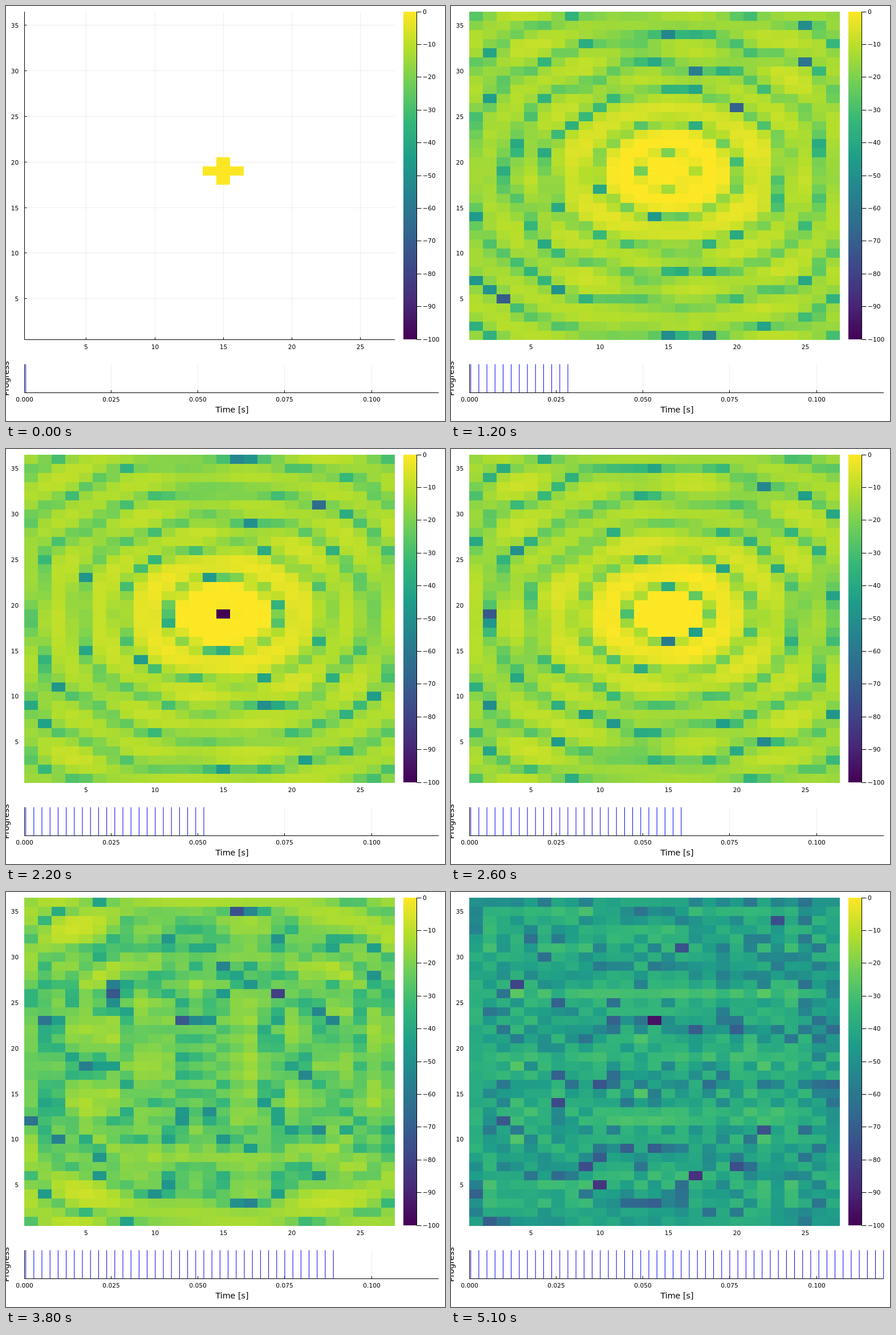
Animation of 770x727 px, one loop 5.2 s. Source, as an HTML page with a canvas:

```html
<!DOCTYPE html>
<html lang="en">
<head>
<meta charset="utf-8">
<title>Sound field</title>
<style>
html, body { margin: 0; width: 770px; height: 727px; overflow: hidden; background: #fff; }
svg, canvas { position: absolute; left: 0; top: 0; }
text { font: 10.67px "DejaVu Sans", sans-serif; fill: #000; }
.title { font-size: 14.3px; text-anchor: middle; }
.axis { stroke: #000; stroke-width: 1; fill: none; }
.grid { stroke: #000; stroke-opacity: .07; stroke-width: 1; }
</style>
</head>
<body>
<svg id="chart" width="770" height="727" viewBox="0 0 770 727">
  <defs><linearGradient id="scale" x1="0" y1="1" x2="0" y2="0"></linearGradient></defs>
</svg>
<canvas id="field" width="770" height="727"></canvas>
<script>
const COLS = 27, ROWS = 36, LAYERS = 16;
const LEFT = 32.5, RIGHT = 682.1, TOP = 10, BOTTOM = 584.5;
const FRAMES = 52, FRAME_MS = 100, STRIDE = 7, RATE = 3000;
const viridis = ['440154', '482878', '3e4989', '31688e', '26828e',
                 '1f9e89', '35b779', '6ece58', 'b5de2b', 'fde725'];
const rgb = viridis.map(h => [0, 2, 4].map(i => parseInt(h.substr(i, 2), 16)));

const colX = c => LEFT + c * (RIGHT - LEFT) / COLS;
const rowY = r => BOTTOM - r * (BOTTOM - TOP) / ROWS;
const timeX = t => 32.6 + t * 6085;

// ---- Static chart ----
const chart = document.getElementById('chart');

function add(tag, attrs, content, parent = chart) {
  const el = document.createElementNS('http://www.w3.org/2000/svg', tag);
  for (const name in attrs) el.setAttribute(name, attrs[name]);
  if (content) el.textContent = content;
  parent.appendChild(el);
}
const path = (cls, d) => add('path', { class: cls, d });
const label = (x, y, anchor, s) => add('text', { x, y, 'text-anchor': anchor }, s);
const snap = v => Math.floor(v) + .5;

function drawChart() {
  for (let v = 5; v <= 25; v += 5) {
    const x = snap(colX(v - .5));
    path('grid', `M${x} ${TOP}V${BOTTOM}`);
    path('axis', `M${x} ${BOTTOM}v-4`);
    label(x, 600.8, 'middle', v);
  }
  for (let v = 5; v <= 35; v += 5) {
    const y = snap(rowY(v - .5));
    path('grid', `M${LEFT} ${y}H${RIGHT}`);
    path('axis', `M${LEFT} ${y}h4`);
    label(22.3, y + 4, 'end', v);
  }
  path('axis', `M${LEFT} ${TOP}V${BOTTOM}H${RIGHT}`);

  const scale = document.getElementById('scale');
  viridis.forEach((c, i) => add('stop', { offset: i / 9, 'stop-color': '#' + c }, '', scale));
  add('rect', { x: 697, y: TOP, width: 23.5, height: 574, fill: 'url(#scale)' });
  path('axis', `M720.5 ${TOP}V${BOTTOM}`);
  for (let i = 0; i <= 10; i++) {
    const y = snap(TOP + i * 57.42);
    path('axis', `M720.5 ${y}h8`);
    label(731, y + 3.6, 'start', i ? '\u2212' + i * 10 : '0');
  }

  for (let i = 0; i <= 4; i++) {
    const x = snap(timeX(i * .025));
    if (i) path('grid', `M${x} 627.5V677`);
    path('axis', `M${x} 677v-4`);
    label(x, 692.8, 'middle', (i * .025).toFixed(3));
  }
  path('axis', 'M32.5 627.5V677.5H759');
  add('text', { x: 396.5, y: 712, class: 'title' }, 'Time [s]');
  add('text', { transform: 'translate(5 652.5) rotate(-90)', class: 'title' }, 'Progress');
}

// ---- Finite-difference room: a sine burst between absorbing walls ----
function simulate() {
  const courant = .5717, c2 = courant * courant, admittance = .85;
  const omega = 2 * Math.PI * 250 / RATE, burst = 240;
  const sx = 1, sy = COLS + 2, sz = sy * (ROWS + 2);
  const at = (x, y, z) => x * sx + y * sy + z * sz;
  const source = at(15, 19, 8);
  const wall = (v, n) => (v === 1) + (v === n);
  let now = new Float64Array(sz * (LAYERS + 2));
  let old = new Float64Array(now.length);
  const shots = [];

  for (let step = 0; shots.length < FRAMES; step++) {
    if (step >= 2 && (step - 2) % STRIDE === 0) {
      const shot = new Float64Array(COLS * ROWS);
      for (let y = 0; y < ROWS; y++)
        for (let x = 0; x < COLS; x++) shot[y * COLS + x] = now[at(x + 1, y + 1, 8)];
      if (step <= burst) shot[18 * COLS + 14] = 10 * Math.sin(omega * step);
      shots.push(shot);
    }
    for (let z = 1; z <= LAYERS; z++)
      for (let y = 1; y <= ROWS; y++)
        for (let x = 1; x <= COLS; x++) {
          const i = at(x, y, z);
          const walls = wall(x, COLS) + wall(y, ROWS) + wall(z, LAYERS);
          const loss = .5 * courant * admittance * walls;
          const sum = now[i - sx] + now[i + sx] + now[i - sy] + now[i + sy] + now[i - sz] + now[i + sz];
          old[i] = ((2 - c2 * (6 - walls)) * now[i] + c2 * sum - (1 - loss) * old[i]) / (1 + loss);
        }
    if (step < burst) old[source] += 15 * Math.sin(omega * step + .64);
    [now, old] = [old, now];
  }
  return shots;
}

// ---- Animation ----
const ctx = document.getElementById('field').getContext('2d');

function colour(p) {
  const db = 20 * Math.log10(Math.abs(p));
  const v = Math.min(1, Math.max(0, 1 + db / 100)) * 9;
  const i = Math.min(8, Math.floor(v)), f = v - i;
  return `rgb(${rgb[i].map((a, n) => Math.round(a + (rgb[i + 1][n] - a) * f))})`;
}

function draw(shot, count) {
  ctx.clearRect(0, 0, 770, 727);
  for (let y = 0; y < ROWS; y++)
    for (let x = 0; x < COLS; x++) {
      const p = shot[y * COLS + x];
      if (Math.abs(p) < 1e-12 && !(x === 14 && y === 18)) continue;
      const x0 = Math.floor(colX(x)), x1 = Math.floor(colX(x + 1));
      const y0 = Math.round(rowY(y + 1)), y1 = Math.round(rowY(y));
      ctx.fillStyle = colour(p);
      ctx.fillRect(x0, y0, x1 - x0, y1 - y0);
    }
  ctx.strokeStyle = '#00f';
  ctx.lineWidth = 1;
  ctx.beginPath();
  for (let i = 0; i <= count; i++) {
    const x = Math.min(758.7, timeX((1 + STRIDE * i) / RATE));
    ctx.moveTo(x, 627.5);
    ctx.lineTo(x, 677);
  }
  ctx.stroke();
}

drawChart();
const shots = simulate();
const start = performance.now();
let shown = -1;

function tick() {
  const k = Math.floor((performance.now() - start) / FRAME_MS) % FRAMES;
  if (k !== shown) draw(shots[shown = k], k);
  requestAnimationFrame(tick);
}
tick();
</script>
</body>
</html>
```
